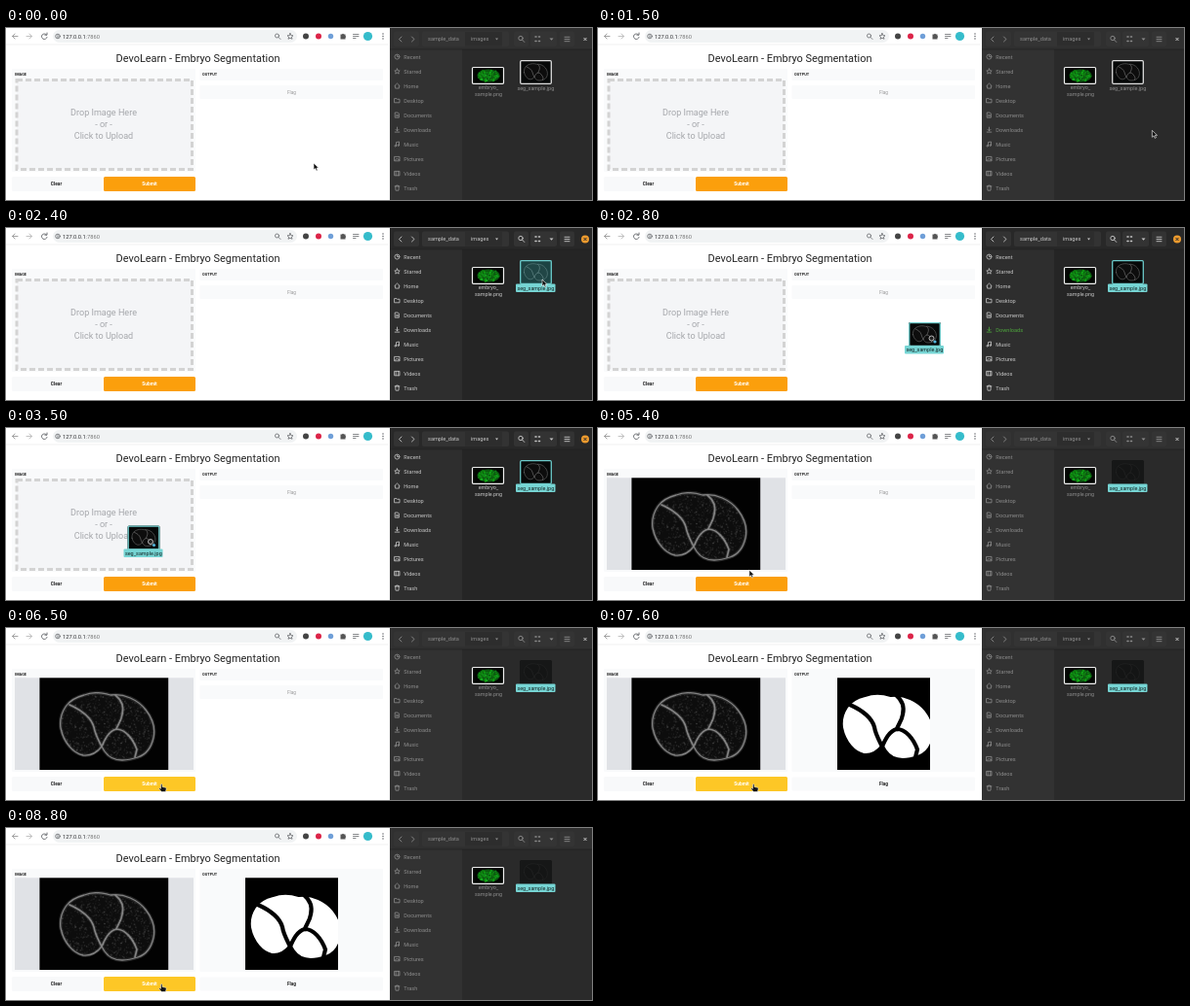
Recreate the animation shown at these times as an HTML page. Size 600x177 px, loop 9000 ms.

```html
<!DOCTYPE html>
<html lang="en">
<head>
<meta charset="utf-8">
<title>Embryo segmentation demo</title>
<style>
html, body { margin: 0; width: 100%; height: 100%; overflow: hidden; background: #fff; }
svg { display: block; width: 100vw; height: 100vh; font-family: Roboto, "Open Sans", sans-serif; }
.mid { text-anchor: middle; }
.line { fill: none; stroke-linecap: round; stroke-linejoin: round; }
#files { --head: #303030; --side: #323232; --main: #2a2a2a; --ink: #8c8c8c; --button: #343434; }
#files.active { --head: #282828; --side: #2e2e2e; --main: #252525; --ink: #c8c8c8; --button: #333; }
</style>
</head>
<body>
<svg viewBox="0 0 600 177" xmlns="http://www.w3.org/2000/svg">
  <defs>
    <path id="outline" d="M56 103C55 96 57 87 61 81C65 75 72 71 80 69C88 66 98 66 107 69C121 67 135 74 143 84C150 93 153 104 151 113C149 122 144 130 135 133C129 135 126 136 119 136C110 136 105 133 101 127L98 122C94 127 88 132 79 131C69 129 59 118 56 103Z"/>
    <g id="walls">
      <path d="M65 79C76 84 87 91 90 102C91 109 95 116 98 122"/>
      <path d="M112 69C118 74 121 81 119 89C118 96 114 100 113 104"/>
      <path d="M98 122C101 115 105 106 113 104C122 104 130 114 134 125L132 133"/>
    </g>
    <g id="embryo">
      <use href="#outline" fill="#0d0d0d"/>
      <g class="line" stroke="#555" stroke-width="3.600" opacity=".4"><use href="#outline"/><use href="#walls"/></g>
      <g class="line" stroke="#999" opacity=".8"><use href="#outline" stroke-width="1.300"/><use href="#walls" stroke-width="1.700"/></g>
    </g>
    <rect id="slide" width="33" height="25" rx="1.500" fill="#060808"/>
    <use id="mini" href="#embryo" transform="translate(-9.500 -13) scale(.25)"/>
    <clipPath id="crop"><rect x="245" y="51.300" width="95" height="94.700"/></clipPath>
    <clipPath id="inside"><use href="#outline"/></clipPath>
  </defs>

  <g id="browser">
    <rect width="393" height="177" fill="#fff"/>
    <g class="line" stroke="#62666a" stroke-width=".9">
      <path d="M12 8.500H6.500M9 6L6.500 8.500L9 11" stroke="#999"/>
      <path d="M21 8.500H26.500M24 6L26.500 8.500L24 11" stroke="#bbb"/>
      <path d="M41.500 7A2.800 2.800 0 1 0 42 9.500M42 5V7.200H39.800"/>
    </g>
    <rect x="48" y="2" width="250" height="13" rx="6.500" fill="#f1f3f4"/>
    <g class="line" stroke="#66696d" stroke-width=".8">
      <circle cx="53" cy="8.500" r="2.300"/><path d="M53 8.300V9.700M53 7.200V7.300"/>
      <circle cx="277.500" cy="8" r="2"/><path d="M279 9.500L281 11.500"/>
      <path d="M291 5.500L291.900 7.600L294 7.800L292.400 9.200L293 11.300L291 10.200L289 11.300L289.600 9.200L288 7.800L290.100 7.600Z"/>
      <path d="M355.500 6.500H361M355.500 8.500H361M355.500 10.500H358"/>
    </g>
    <text x="58" y="10.700" font-size="5.700" fill="#303134">127.0.0.1<tspan fill="#777">:7860</tspan></text>
    <circle cx="307" cy="8.500" r="3" fill="#444"/>
    <circle cx="320" cy="8.500" r="3" fill="#dc2448"/>
    <circle cx="332.500" cy="8.500" r="2.700" fill="#6f9fd8"/>
    <path d="M342.500 6.500H344A1.200 1.200 0 0 1 346 6.500H347.500V8A1.200 1.200 0 0 1 347.500 10V11.500H342.500Z" fill="#555"/>
    <circle cx="370.500" cy="8.500" r="4.600" fill="#35bccb"/>
    <g fill="#5f6368"><circle cx="386" cy="6" r=".75"/><circle cx="386" cy="8.500" r=".75"/><circle cx="386" cy="11" r=".75"/></g>
    <path d="M0 17H392" stroke="#e8e8e8" stroke-width=".6"/>

    <text class="mid" x="196.500" y="35" font-size="10.950" fill="#222">DevoLearn - Embryo Segmentation</text>
    <rect x="6" y="42" width="188" height="106" rx="1" fill="#f9fafb"/>
    <text x="9" y="49" font-size="3.900" font-weight="700" fill="#222">IMAGE</text>
    <g id="drop">
      <rect x="11" y="53.500" width="179.500" height="92" fill="#f4f5f7" stroke="#d3d3d3" stroke-width="3" stroke-dasharray="6 3"/>
      <g class="mid" font-size="9.050" fill="#a5a7ab">
        <text x="100" y="90">Drop Image Here</text>
        <text x="100" y="102">- or -</text>
        <text x="100" y="114">Click to Upload</text>
      </g>
    </g>
    <g id="photo">
      <rect x="9" y="51.300" width="183" height="94.700" fill="#e0e2e6"/>
      <rect x="34.400" y="51.300" width="131.800" height="94.700" fill="#020202"/>
      <use href="#embryo"/>
      <g id="grain" clip-path="url(#inside)" fill="#aaa"></g>
    </g>
    <rect x="6" y="153" width="92" height="15" rx="1.500" fill="#f8f9fa"/>
    <rect id="submit" x="100" y="153" width="94" height="15" rx="1.500"/>
    <g class="mid" font-size="4.800" font-weight="700">
      <text x="51.500" y="162.400" fill="#222">Clear</text>
      <text x="147" y="162.400" fill="#fff">Submit</text>
    </g>
    <rect id="panel" x="198.500" y="42" width="187.500" rx="1" fill="#f9fafb"/>
    <text x="201" y="49" font-size="3.900" font-weight="700" fill="#222">OUTPUT</text>
    <g id="result" clip-path="url(#crop)">
      <rect x="245" y="51" width="95" height="96" fill="#000"/>
      <g transform="translate(193 0)" class="line" stroke="#000" stroke-width="4.200">
        <use href="#outline" fill="#fff"/>
        <use href="#walls"/>
      </g>
    </g>
    <g id="flag">
      <rect x="198.500" y="59" width="187.500" height="14" rx="1" fill="#f9fafb"/>
      <text id="flagText" class="mid" x="292.500" y="67.900" font-size="4.800">Flag</text>
    </g>
  </g>

  <g id="files">
    <rect x="393" width="207" height="177" fill="var(--main)"/>
    <rect x="393" y="22" width="74" height="155" fill="var(--side)"/>
    <rect x="393" width="207" height="22" fill="var(--head)"/>
    <path d="M393 22H600" stroke="#222" stroke-width=".7"/>
    <g fill="var(--button)">
      <rect x="397" y="3.500" width="26" height="15.500" rx="2"/>
      <rect x="426" y="3.500" width="89" height="15.500" rx="2"/>
      <rect x="520" y="3.500" width="15" height="15.500" rx="2"/>
      <rect x="537" y="3.500" width="27" height="15.500" rx="2"/>
      <rect x="567" y="3.500" width="15" height="15.500" rx="2"/>
    </g>
    <rect x="470" y="4" width="38" height="14.500" fill="#1f1f1f" opacity=".3"/>
    <g class="line" stroke="var(--ink)" stroke-width=".9">
      <path d="M405 9L402.500 11.500L405 14M415.500 9L418 11.500L415.500 14"/>
      <path d="M501 10.500H504L502.500 12.500Z" fill="var(--ink)" stroke="none"/>
      <circle cx="527" cy="10.500" r="2.200"/><path d="M528.600 12.200L530.800 14.500"/>
      <path d="M542 9H543M542 13.500H543M545.500 9H546.500M545.500 13.500H546.500" stroke-width="1.600"/>
      <path d="M556.500 10.500H560.500L558.500 12.800Z" fill="var(--ink)" stroke="none"/>
      <path d="M572 9.300H577M572 11.500H577M572 13.700H577"/>
    </g>
    <g font-size="5.600" fill="var(--ink)">
      <text x="432" y="13.400">sample_data</text>
      <text x="476" y="13.400">images</text>
    </g>
    <circle id="close" cx="593" cy="11.500" r="4" fill="#ee9b2e"/>
    <path id="cross" d="M591.500 10L594.500 13M594.500 10L591.500 13" stroke-width="1"/>
    <g id="places" font-size="5.600"></g>

    <rect x="477.500" y="40.500" width="32" height="16.800" rx="1" fill="#030603" stroke="#eee" stroke-width="1.200"/>
    <ellipse cx="494" cy="49" rx="11.500" ry="6.600" fill="#0c5a10"/>
    <g id="dots"></g>
    <g class="mid" font-size="5.400" fill="var(--ink)">
      <text x="494" y="63">embryo_</text>
      <text x="494" y="70">sample.png</text>
    </g>
    <g transform="translate(526 33)">
      <use id="back" href="#slide"/>
      <use id="thumb" href="#mini"/>
      <rect id="tint" width="33" height="25" fill="#4fcaca" opacity=".3"/>
      <rect id="frame" x=".7" y=".7" width="31.600" height="23.600" rx="1" fill="none" stroke-width="1.300"/>
      <rect id="mark" x="-4" y="24.500" width="40.500" height="8.500" rx="1" fill="#76d5d4"/>
      <text id="fileName" class="mid" x="16.300" y="30.800" font-size="5.450">seg_sample.jpg</text>
    </g>
  </g>

  <g id="drag">
    <use href="#slide"/>
    <use href="#mini"/>
    <rect x=".7" y=".7" width="31.600" height="23.600" rx="1" fill="none" stroke="#73cfcf" stroke-width="1.300"/>
    <rect x="-4" y="24" width="40" height="8.500" rx="1" fill="#76d5d4"/>
    <text class="mid" x="16.300" y="30.300" font-size="5.450" fill="#132525">seg_sample.jpg</text>
    <circle cx="23.500" cy="16.500" r="2.500" fill="#222" stroke="#ddd" stroke-width=".8"/>
    <circle cx="27" cy="20" r="1.600" fill="#52b6dc"/>
  </g>
  <path id="arrow" d="M0 0V7L1.700 5.500L2.800 8L4.100 7.400L3 5H5.200Z" fill="#111" stroke="#fff" stroke-width=".6"/>
  <path id="hand" d="M0 .4Q.8-.4 1.500.5V3L5 3.800Q5.800 4 5.600 5.200L4.900 8H.8L-1.800 5Q-1.500 3.900-.4 4.600L0 4.900Z" fill="#111" stroke="#fff" stroke-width=".5"/>
</svg>
<script>
const LOOP = 9000, STEP = 100;
const PRESS = 2000, LIFT = 2500, RELEASE = 3800, DONE = 7200;
const $ = id => document.getElementById(id);

// Pointer stops: time, x, y
const stops = [
  [0, 315, 139], [500, 315, 139], [800, 420, 138], [1200, 578, 140],
  [1300, 578, 140], [1600, 562, 88], [1800, 549, 53], [2400, 549, 53],
  [2500, 545, 55], [2700, 425, 100], [2800, 341, 117], [2900, 287, 123],
  [3200, 195, 122], [3500, 147.5, 120.5], [3800, 149, 115.5],
  [5000, 149, 115.5], [5300, 153, 139], [5600, 158.5, 160.5], [LOOP, 158.5, 160.5]
];

const icons = {
  Recent: "M2.500 0A2.500 2.500 0 1 1-2.500 0A2.500 2.500 0 1 1 2.500 0M0-1.500V0H1.300",
  Starred: "M0-2.700L.8-.8L2.700-.6L1.300.6L1.700 2.500L0 1.500L-1.700 2.500L-1.300.6L-2.700-.6L-.8-.8Z",
  Home: "M-2.700 0L0-2.600L2.700 0M-1.900 0V2.500H1.900V0",
  Desktop: "M-2.500-2H-.5L0-1.300H2.500V2.200H-2.500Z",
  Documents: "M-1.900-2.600H.8L1.900-1.500V2.600H-1.900ZM-.8 0H.8M-.8 1.200H.8",
  Downloads: "M0-2.500V1.200M-1.500-.2L0 1.300L1.500-.2M-2.300 2.500H2.300",
  Music: "M-1 1.700V-2L2-2.600V1.100M-1 1.700A.8.8 0 1 1-2.600 1.700A.8.8 0 1 1-1 1.700M2 1.100A.8.8 0 1 1 .4 1.100A.8.8 0 1 1 2 1.100",
  Pictures: "M-2.500-2.200H2.500V2.200H-2.500ZM-2.200 1.700L-.5-.3L.6.8L1.400.1L2.300 1.400",
  Videos: "M-2.500-2.200H2.500V2.200H-2.500ZM-1.300-2.200V2.200M1.300-2.200V2.200",
  Trash: "M-2.400-1.700H2.400M-1-1.700V-2.600H1V-1.700M-1.800-1.700L-1.500 2.600H1.500L1.800-1.700"
};

function add(parent, tag, attrs, text = "") {
  const el = document.createElementNS("http://www.w3.org/2000/svg", tag);
  for (const key in attrs) el.setAttribute(key, attrs[key]);
  el.textContent = text;
  return parent.appendChild(el);
}

function randomizer(seed) {
  return () => (seed = (seed * 16807) % 2147483647) / 2147483647;
}

function scatter(parent, count, cx, cy, rx, ry, draw) {
  const rand = randomizer(count * 31);
  for (let i = 0; i < count; i++) {
    const a = rand() * Math.PI * 2, r = Math.sqrt(rand());
    add(parent, "circle", { cx: cx + rx * r * Math.cos(a), cy: cy + ry * r * Math.sin(a), ...draw(rand) });
  }
}

const places = Object.entries(icons).map(([name, d], i) => {
  const y = 29.6 + i * 15;
  const row = add($("places"), "g", {});
  add(row, "path", { class: "line", d, transform: `translate(400.500 ${y})`, stroke: "currentColor", "stroke-width": .8 });
  add(row, "text", { x: 407.3, y: y + 2, fill: "currentColor" }, name);
  row.style.color = "var(--ink)";
  return row;
});

scatter($("grain"), 900, 104, 101, 48, 35, r => ({ r: .4 + r() * .6, opacity: .03 + r() * .16 }));
scatter($("dots"), 90, 494, 49, 11, 6.2, r => ({ r: .5 + r() * .5, fill: `hsl(${118 + r() * 8} 80% ${26 + r() * 14}%)` }));

function pointer(t) {
  const i = stops.findIndex(s => s[0] > t);
  const [t0, x0, y0] = stops[i - 1], [t1, x1, y1] = stops[i];
  const k = (t - t0) / (t1 - t0);
  return [x0 + (x1 - x0) * k, y0 + (y1 - y0) * k];
}

const show = (id, on) => $(id).style.display = on ? "" : "none";
const set = (id, key, value) => $(id).setAttribute(key, value);
const move = (id, x, y) => set(id, "transform", `translate(${x} ${y})`);

function draw(t) {
  const [x, y] = pointer(t);
  const selected = t >= PRESS, dropped = t >= RELEASE, done = t >= DONE;
  const active = selected && !dropped;
  const dragging = t >= LIFT && !dropped;
  const hover = dropped && y >= 153;

  $("files").classList.toggle("active", active);
  show("close", active);
  set("cross", "stroke", active ? "#2b2b2b" : "#c4c4c4");
  places[5].style.color = t >= 2700 && t < 2900 ? "#4fa83d" : "var(--ink)";

  set("back", "opacity", dropped ? .55 : 1);
  set("thumb", "opacity", dropped ? .15 : 1);
  show("tint", selected && t < LIFT);
  show("frame", !dropped);
  set("frame", "stroke", selected ? "#6ccaca" : "#ddd");
  show("mark", selected);
  set("fileName", "fill", selected ? "#132525" : "var(--ink)");

  show("drop", !dropped);
  show("photo", dropped);
  set("submit", "fill", hover ? "#fdc726" : "#fb9f0c");
  set("panel", "height", done ? 106 : 12);
  show("result", done);
  move("flag", 0, done ? 94.5 : 0);
  set("flagText", "fill", done ? "#222" : "#999");
  set("flagText", "font-weight", done ? 700 : 400);

  show("drag", dragging);
  move("drag", x - 23, y - 20);
  show("arrow", !dragging && !hover);
  move("arrow", x, y);
  show("hand", hover);
  move("hand", x, y);
}

function tick() {
  draw(Math.floor(performance.now() % LOOP / STEP) * STEP);
  requestAnimationFrame(tick);
}
tick();
</script>
</body>
</html>
```
